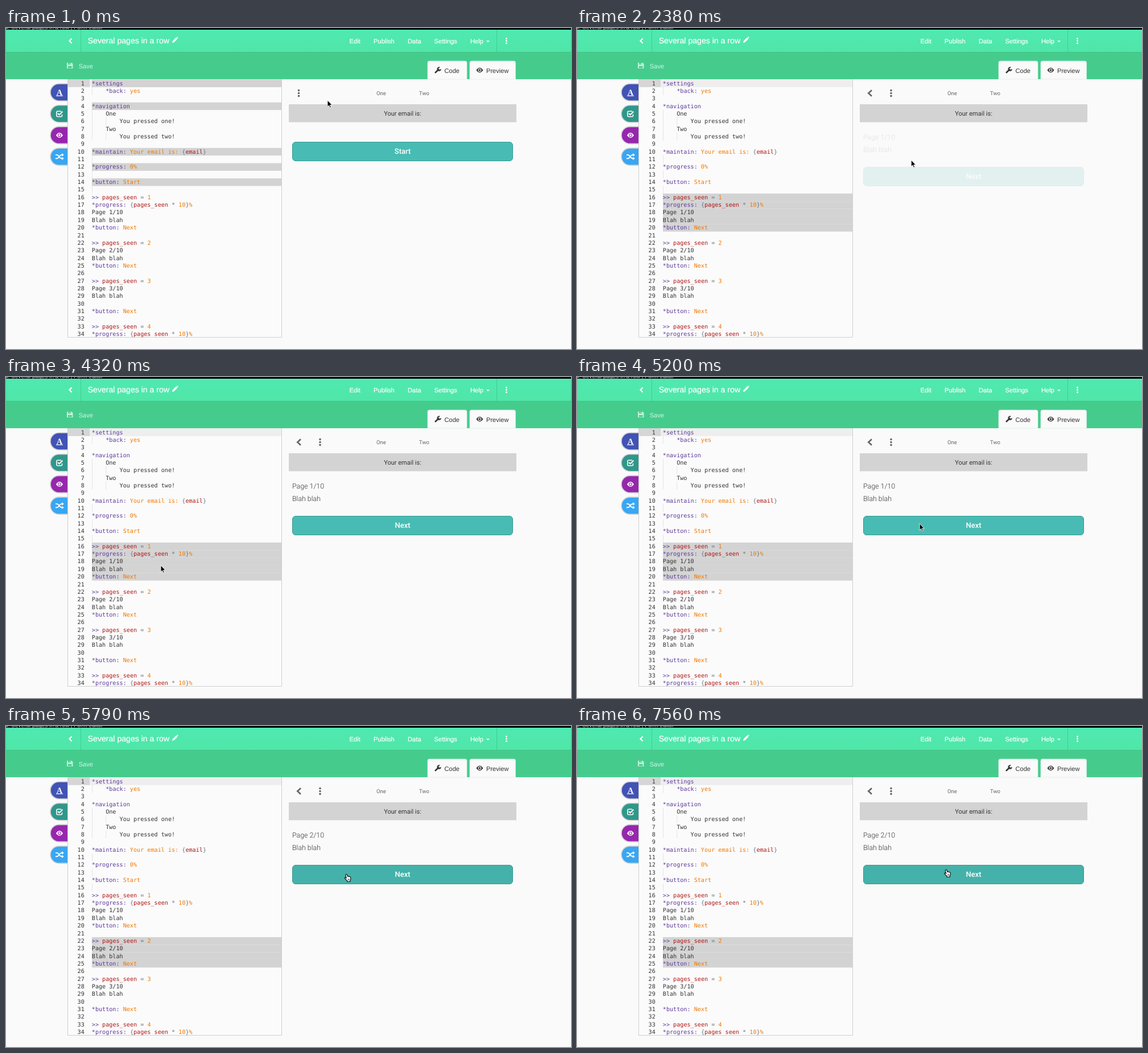
An HTML page that plays this animation: 993 px wide and 564 px high, repeating every 8000 ms.

```html
<!DOCTYPE html>
<html lang="en">
<head>
<meta charset="utf-8">
<title>Page editor</title>
<style>
  html, body { margin: 0; width: 100%; height: 100%; overflow: hidden; background: #fafafa; }
  svg { display: block; }
  text { white-space: pre; text-rendering: geometricPrecision; font-family: "Liberation Sans", Arial, sans-serif; }
  .code { font: 10.13px "DejaVu Sans Mono", monospace; fill: #333; }
  .page { font-family: Roboto, sans-serif; fill: #333; }
  .nav { font-size: 11.2px; fill: #fff; stroke: #fff; stroke-width: .2px; }
  .label { font-size: 11.1px; fill: #333; }
  .key { fill: #5e3b9b; }
  .val { fill: #f07800; }
  .name { fill: #b01717; }
  .op { fill: #687687; }
</style>
</head>
<body>
<svg id="stage" width="993" height="564" viewBox="0 0 993 564"></svg>
<script>
const LOOP = 8000, ROW = 13.35, TOP = 90.6;

const block = (n, gap = '') => `>> pages_seen = ${n}
${n === 1 || n === 4 ? '*progress: {pages_seen * 10}%\n' : ''}Page ${n}/10
Blah blah
${gap}*button: Next
`;
const source = `*settings
    *back: yes

*navigation
    One
        You pressed one!
    Two
        You pressed two!

*maintain: Your email is: {email}

*progress: 0%

*button: Start

${block(1)}
${block(2)}
${block(3, '\n')}
${block(4)}`.split('\n').slice(0, 34);

const span = (cls, s) => `<tspan class="${cls}">${s.replace(/>/g, '&gt;')}</tspan>`;
const expression = s => s.replace(/[a-z_]+|\d+|[*=]/g, m =>
  span(/[a-z]/.test(m) ? 'name' : /\d/.test(m) ? 'val' : 'op', m));

function colour(line) {
  if (line.startsWith('>>')) return span('key', '>>') + expression(line.slice(2));
  const m = line.match(/^(\s*)(\*\w+:?)(.*)$/);
  if (!m) return line;
  const value = m[3].split(/({.*?})/).map(part =>
    part[0] === '{' ? span('op', '{') + expression(part.slice(1, -1)) + span('op', '}') : part && span('val', part));
  return m[1] + span('key', m[2]) + value.join('');
}

const rect = (x, y, w, h, fill, more = '') =>
  `<rect x="${x}" y="${y}" width="${w}" height="${h}" fill="${fill}" ${more}/>`;
const text = (x, y, s, cls, more = '') => `<text x="${x}" y="${y}" class="${cls}" ${more}>${s}</text>`;
const stroke = (d, color, width, more = '') =>
  `<path d="${d}" fill="none" stroke="${color}" stroke-width="${width}" ${more}/>`;
const at = (x, y, body, more = '') => `<g transform="translate(${x} ${y})" ${more}>${body}</g>`;
const dots = (x, y, gap, r, fill) =>
  [-gap, 0, gap].map(d => `<circle cx="${x}" cy="${y + d}" r="${r}" fill="${fill}"/>`).join('');
const rows = (list, fill) => list.map(n => rect(151, TOP + (n - 1) * ROW, 333.5, ROW + .05, fill)).join('');

const eye = (fill, hole) => `<path d="M-6 0Q0-8.6 6 0Q0 8.6-6 0Z" fill="${fill}"/>
  <circle r="2.9" fill="${hole}"/><circle r="1.8" fill="${fill}"/>`;

function header() {
  const menu = [[603.5, 'Edit'], [646, 'Publish'], [706, 'Data'], [752.5, 'Settings'], [816, 'Help']];
  return rect(0, 0, 993, 3, '#000') +
    text(-4, 1.6, 'al: Several pages in a row | Form editor', 'top', 'font-size="10" fill="#ddd"') +
    rect(0, 3, 993, 39, 'url(#bar)') + rect(0, 42, 993, 48, '#45cc8d') +
    rect(0, 42, 993, 1, '#42c387') +
    rect(131, 3, 1, 39, '#3fcf95') + rect(862, 3, 1, 39, '#3fcf95') +
    stroke('M115.6 18.5L111.4 22.6L115.6 26.7', '#fff', 2.2) +
    text(143.7, 27.3, 'Several pages in a row', 'nav', 'style="font-size:14.1px"') +
    at(297, 21, `<path d="M-5 5L-4.2 1.8L2-4.4L4.4-2L-1.8 4.2Z" fill="#fff"/>
      <path d="M2.7-5L3.5-5.6Q4.2-6 4.9-5.3L5.4-4.7Q5.9-4 5.2-3.3L4.9-2.7Z" fill="#fff"/>`) +
    menu.map(([x, s]) => text(x, 26.8, s, 'nav')).join('') +
    '<path d="M844 22.3H850L847 25.3Z" fill="#fff"/>' +
    dots(879.5, 22.6, 4.1, 1.5, '#fff') +
    at(107, 61, `<path d="M0 0H8.4L10.5 2V10H0Z" fill="#c4efdb"/>` +
      rect(2.3, 0, 4.7, 3.2, '#45cc8d') + rect(4.8, .6, 1.4, 2, '#c4efdb') + rect(2, 6, 6.5, 3.2, '#45cc8d')) +
    text(127.7, 70.6, 'Save', 'label', 'style="fill:#d3f4e5"') +
    ['M741 90V61Q741 58 744 58H807Q810 58 810 61V90Z', 'M815 90V61Q815 58 818 58H892.5Q895.5 58 895.5 61V90Z']
      .map(d => `<path d="${d}" fill="#fafafa" stroke="#d4eee2" stroke-width=".7"/>`).join('') +
    at(759, 74, stroke('M-4.3 4.2L1.5-1.2', '#333', 2.6, 'stroke-linecap="round"') +
      stroke('M3.2-4.6A2.8 2.8 0 1 0 5-1.6', '#333', 2)) +
    text(770.5, 78.7, 'Code', 'label') +
    at(832.5, 74, eye('#333', '#fafafa')) + text(844, 78.7, 'Preview', 'label');
}

function sidebar() {
  const icons = [
    '<text y="4.5" text-anchor="middle" style="font:bold 14.5px Liberation Serif,serif" fill="#fff">A</text>' +
      rect(-6, 5.6, 12, 1.2, '#fff'),
    stroke('M4.5 1V3.5Q4.5 5 3 5H-3.5Q-5 5-5 3.5V-3Q-5-4.5-3.5-4.5H3', '#fff', 1.6) +
      stroke('M-2.8-.6L-.4 1.8L5.4-4', '#fff', 2.1),
    eye('#fff', '#9627ad'),
    stroke('M-7-3.2H-4.5C-1-3.2 0 3.2 3.4 3.2H5M-7 3.2H-4.5C-1 3.2 0-3.2 3.4-3.2H5', '#fff', 1.9) +
      '<path d="M4.2-6L7.8-3.2L4.2-.4ZM4.2 .4L7.8 3.2L4.2 6Z" fill="#fff"/>'
  ];
  return ['#4153b4', '#30978a', '#9627ad', '#38a6f3'].map((fill, i) => at(0, 113 + i * 37.7,
    `<path d="M109-15H93A15 15 0 0 0 93 15H109Z" fill="${fill}" stroke="#cdcfd2" stroke-width="1.6"/>` +
    at(94, 0, icons[i]))).join('');
}

function editor() {
  const line = (s, i) => {
    const y = TOP + i * ROW + 9.9;
    return text(137.8, y, i + 1, 'code', 'text-anchor="end"') + text(150.8, y, colour(s), 'code');
  };
  const guide = x => n => stroke(`M${x} ${TOP + (n - 1) * ROW}v${ROW}`, '#c4c4c4', .8, 'stroke-dasharray="1 1"');
  return `<g clip-path="url(#editor)">` + rect(109, 90, 376, 453, '#fbfbfb') +
    rect(109, 90, 38, 13.8, '#d6d6d6') + rect(147, 90, 338, 13.8, '#eeeeee') +
    `<g id="marks0">${rows([1, 4, 10, 12, 14], '#d3d3d3')}</g>
     <g id="marks1">${rows([16, 17, 18, 19, 20], '#d3d3d3')}</g>
     <g id="marks2">${rows([22, 23, 24, 25], '#d3d3d3')}</g>` +
    [2, 5, 6, 7, 8, 11, 13, 15].map(guide(151.5)).join('') + [6, 8].map(guide(175.7)).join('') +
    source.map(line).join('') + '</g>' +
    stroke('M108.5 90V543.5H484.5V90', '#cfcfcf', 1);
}

const button = (id, y, label) =>
  `<rect id="${id}" x="503.5" y="${y + .5}" width="387" height="33" rx="5.5" stroke="#37968f" fill="#48bcb4"/>` +
  text(697, y + 21.3, label, 'page', 'text-anchor="middle" style="font-size:13px;font-weight:500;fill:#fff"');

function preview() {
  const body = 'style="font-size:12.4px;font-weight:300"';
  const tab = 'style="font-size:9.5px;fill:#666"';
  return text(651, 118.4, 'One', 'page', tab) + text(726, 118.4, 'Two', 'page', tab) +
    rect(497, 134, 400, 31.5, '#d3d3d3') +
    text(697, 153.8, 'Your email is:', 'page', 'text-anchor="middle" style="font-size:11px"') +
    `<g id="intro">${dots(514.5, 114.5, 4.9, 1.8, '#666')}${button('start', 200, 'Start')}</g>` +
    `<g id="back">${stroke('M518 109.2L512.3 114.5L518 119.8', '#666', 2.7)}${dots(552, 114.5, 4.9, 1.8, '#666')}</g>` +
    `<g id="content">${text(503, 196.2, '', 'page', 'id="heading" ' + body)}` +
    text(503, 218.2, 'Blah blah', 'page', body) + button('next', 244, 'Next') + '</g>';
}

const arrow = `<path d="M0 0V11.6L2.7 9.1L4.4 13.2L6.3 12.4L4.6 8.4H8.2Z" fill="#000" stroke="#fff" stroke-width=".9"/>`;
const hand = `<path d="M2.2 1.2Q3.4-.2 4.5 1.4L5.3 4.2Q6.5 3.4 7.2 4.4Q8.4 3.8 9 5Q10.5 4.6 10.8 6.4Q11.2 9 9.8 11.2V13.2H4.6V11.8
  Q2.6 10.2.6 7.6Q-.1 6.2 1.4 6L3.2 7L1.9 2.8Q1.7 1.8 2.2 1.2Z" fill="#fff" stroke="#000" stroke-width="1.1"/>
  <path d="M6.3 8.3V11M8 8.3V11" stroke="#000" stroke-width=".7"/>`;

document.getElementById('stage').innerHTML = `<defs>
  <linearGradient id="bar" x2="0" y2="1"><stop stop-color="#4fe9b1"/><stop offset="1" stop-color="#50e6a8"/></linearGradient>
  <clipPath id="editor"><rect x="109" y="90" width="375.5" height="453"/></clipPath></defs>` +
  rect(0, 0, 993, 564, '#fafafa') + header() + sidebar() + editor() + preview() +
  `<g id="arrow">${arrow}</g><g id="hand">${hand}</g>`;

const pointer = [
  [0, 565, 127], [150, 547, 133.5], [1190, 571, 190], [1340, 586.5, 225.5], [1630, 587, 229], [1780, 587.3, 232],
  [3430, 399, 294], [3580, 325, 297], [3720, 280, 300], [3870, 260, 306], [4020, 260, 316],
  [4170, 266, 326], [4310, 272, 331], [4460, 272, 332],
  [4610, 290, 338], [4760, 400, 339], [4900, 562, 310], [5050, 614, 247], [5200, 602, 257.5],
  [5490, 595, 260], [5930, 540, 280], [6080, 430, 325], [6230, 345, 360], [6370, 302, 382], [6520, 290, 392],
  [6670, 292, 404], [6820, 330, 407], [6970, 462, 357], [7120, 575, 292], [7270, 651, 240], [7410, 650, 247],
  [7560, 645.5, 252]
];
const isHand = t => t >= 5490 && t < 5930 || t >= 7270;
const fade = age => age < 150 ? .13 : age < 300 ? .62 : 1;

const $ = id => document.getElementById(id);
const show = (id, on) => $(id).setAttribute('visibility', on ? 'visible' : 'hidden');

function draw(t) {
  const page = t < 2380 ? 0 : t < 5490 ? 1 : 2;
  const onHand = isHand(t);
  [0, 1, 2].forEach(n => show('marks' + n, n === page));
  show('intro', page === 0);
  show('back', page > 0);
  show('content', page > 0);
  $('heading').textContent = `Page ${page}/10`;
  $('content').setAttribute('opacity', fade(t - (page === 2 ? 5490 : 2380)));
  $('next').setAttribute('fill', onHand ? '#44b2aa' : '#48bcb4');
  const [, x, y] = pointer.filter(p => p[0] <= t).pop();
  show('arrow', !onHand);
  show('hand', onHand);
  for (const id of ['arrow', 'hand']) $(id).setAttribute('transform', `translate(${x} ${y})`);
}

const began = performance.now();
function tick() {
  draw((performance.now() - began) % LOOP);
  requestAnimationFrame(tick);
}
tick();
</script>
</body>
</html>
```
